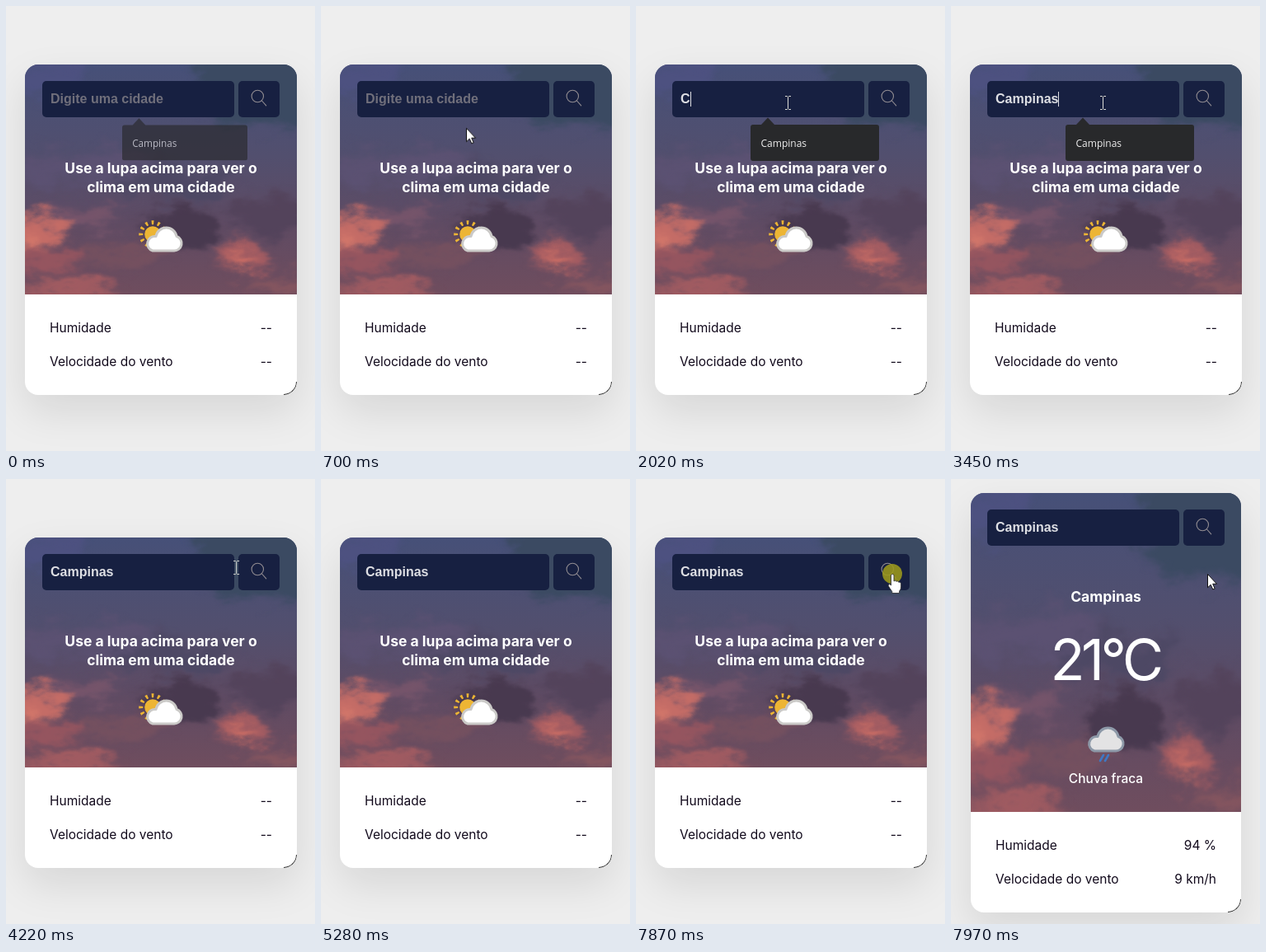
Write an HTML page that moves like this. It is 375x540 px and loops after 8 s.

```html
<!DOCTYPE html>
<html lang="pt-BR">
<head>
<meta charset="utf-8">
<title>Clima</title>
<style>
  html, body { margin: 0; width: 100%; height: 100%; overflow: hidden; background: #eee; }
  .stage { position: absolute; left: 0; top: 0; width: 375px; height: 540px; overflow: hidden; background: #eee; }
  .stage * { animation-duration: 8s; animation-iteration-count: infinite; animation-timing-function: step-end; }
  .ui { position: absolute; left: 0; top: 0; }

  .card {
    position: absolute; left: 23px; top: 71px; width: 330px; height: 401px;
    border-radius: 16px; overflow: hidden; background: #fff;
    box-shadow: 0 20px 50px rgba(0, 0, 0, .1);
    animation-name: grow;
  }
  .card::after {
    content: ""; position: absolute; right: 0; bottom: 0; width: 15px; height: 15px;
    border: solid #333; border-width: 0 1px 1px 0; border-bottom-right-radius: 16px;
  }
  .sky { display: block; width: 100%; height: calc(100% - 122px); }

  text { font-family: Inter, sans-serif; }
  .title { font-size: 17.5px; font-weight: 700; fill: #fff; text-anchor: middle; }
  .row { font-size: 15.5px; fill: #120a1c; }
  .end { text-anchor: end; }
  .temp { font-size: 69px; letter-spacing: -4.5px; fill: #fff; text-anchor: middle; }
  .note { font-size: 15.5px; font-weight: 500; fill: #fff; text-anchor: middle; }

  .before { animation-name: before; }
  .after { opacity: 0; animation-name: after; }
  .search { animation-name: lift; }
  .labels { animation-name: drop; }

  .field { font: bold 16px/18px "Liberation Sans", Arial, sans-serif; height: 18px; white-space: pre; color: #dedfe4; }
  .field span { display: inline-block; height: 18px; border-right: 1px solid transparent; animation-name: caret; }
  .field span::after { content: ""; animation: type 8s step-end infinite; }
  .hint { font: bold 16px "Liberation Sans", Arial, sans-serif; fill: #706f7b; animation-name: hint; }

  .tip { transform-origin: 217px 164px; animation-name: tip; animation-timing-function: linear; }
  .tip text { font: 12px "Open Sans", sans-serif; fill: #eee; }

  .pointer { animation-name: move; animation-timing-function: linear; }
  .arrow { animation-name: arrow; }
  .ibeam { animation-name: ibeam; }
  .hand { animation-name: hand; }
  .click { opacity: 0; animation-name: click; }

  @keyframes grow { 99.625% { left: 24px; top: 17px; width: 328px; height: 509px; } }
  @keyframes before { 99.625%, 100% { opacity: 0; } }
  @keyframes after { 99.625%, 100% { opacity: 1; } }
  @keyframes lift { 0% { transform: none; } 99.625%, 100% { transform: translate(0, -54px); } }
  @keyframes drop { 0% { transform: none; } 99.625%, 100% { transform: translate(1px, 54px); } }

  @keyframes hint { 0% { opacity: 1; } 25.25%, 100% { opacity: 0; } }
  @keyframes type {
    0% { content: ""; }
    25.25% { content: "C"; }
    32% { content: "Ca"; }
    33.5% { content: "Cam"; }
    36% { content: "Camp"; }
    38.5% { content: "Campi"; }
    39.75% { content: "Campin"; }
    41.625% { content: "Campina"; }
    42.75%, 100% { content: "Campinas"; }
  }
  @keyframes caret {
    0% { border-color: transparent; }
    13.75% { border-color: #dedfe4; }
    20.75% { border-color: transparent; }
    25.25% { border-color: #dedfe4; }
    50%, 100% { border-color: transparent; }
  }
  @keyframes tip {
    0% { opacity: .66; transform: scale(.975); }
    1.875%, 13.2% { opacity: 0; transform: scale(.95); }
    15.25%, 43.4% { opacity: 1; transform: none; }
    45%, 100% { opacity: 0; transform: scale(.95); }
  }

  @keyframes move {
    0%, .625% { transform: translate(311px, 498px); animation-timing-function: ease-in-out; }
    8.75% { transform: translate(176px, 148px); }
    10.625%, 50% { transform: translate(184px, 117px); }
    52.75% { transform: translate(279px, 107px); animation-timing-function: ease-out; }
    58.375%, 64.125% { transform: translate(303px, 119px); }
    66%, 89.49% { transform: translate(385px, 120px); }
    89.5% { transform: translate(368px, 148px); }
    91.375%, 93.25% { transform: translate(291px, 115px); }
    93.875%, 100% { transform: translate(311px, 115px); }
  }
  @keyframes arrow {
    0% { opacity: 0; } .625% { opacity: 1; } 9.5% { opacity: 0; }
    64.9% { opacity: 1; } 66% { opacity: 0; }
    89.5% { opacity: 1; } 90.5% { opacity: 0; }
    99.625%, 100% { opacity: 1; }
  }
  @keyframes ibeam { 0% { opacity: 0; } 9.5% { opacity: 1; } 53.2%, 100% { opacity: 0; } }
  @keyframes hand {
    0% { opacity: 0; } 53.2% { opacity: 1; } 64.9% { opacity: 0; }
    90.5% { opacity: 1; } 99.625%, 100% { opacity: 0; }
  }
  @keyframes click { 0% { opacity: 0; } 98.375% { opacity: .88; } 99.625%, 100% { opacity: 0; } }
</style>
</head>
<body>
<div class="stage">
  <div class="card">
    <svg class="sky" viewBox="0 0 330 279" preserveAspectRatio="none">
      <defs>
        <linearGradient id="dusk" x2="0" y2="1">
          <stop stop-color="#465078"/>
          <stop offset=".4" stop-color="#524f6e"/>
          <stop offset=".7" stop-color="#5f4b63"/>
          <stop offset="1" stop-color="#6f4d5e"/>
        </linearGradient>
        <filter id="cloudy" filterUnits="userSpaceOnUse" x="-40" y="-40" width="410" height="360" color-interpolation-filters="sRGB">
          <feGaussianBlur stdDeviation="6" result="soft"/>
          <feTurbulence type="fractalNoise" baseFrequency=".022 .04" numOctaves="4" seed="7"/>
          <feDisplacementMap in="soft" scale="50" xChannelSelector="R" yChannelSelector="G"/>
        </filter>
      </defs>
      <rect width="330" height="279" fill="url(#dusk)"/>
      <g filter="url(#cloudy)">
        <ellipse cx="300" cy="25" rx="100" ry="50" fill="#3b4a62"/>
        <ellipse cx="25" cy="15" rx="50" ry="20" fill="#4d5180"/>
        <ellipse cx="75" cy="125" rx="80" ry="22" fill="#5b5172"/>
        <ellipse cx="180" cy="145" rx="70" ry="20" fill="#4d4864"/>
        <ellipse cx="75" cy="185" rx="45" ry="14" fill="#75546a"/>
        <ellipse cx="190" cy="198" rx="50" ry="24" fill="#48394f"/>
        <ellipse cx="300" cy="180" rx="50" ry="22" fill="#53435b"/>
        <ellipse cx="120" cy="230" rx="60" ry="14" fill="#74505f"/>
        <ellipse cx="20" cy="240" rx="50" ry="15" fill="#95555f"/>
        <ellipse cx="20" cy="200" rx="34" ry="18" fill="#c46c66"/>
        <ellipse cx="8" cy="218" rx="16" ry="11" fill="#d2766a"/>
        <ellipse cx="55" cy="275" rx="65" ry="10" fill="#a45c61"/>
        <ellipse cx="265" cy="232" rx="32" ry="18" fill="#a15b61"/>
        <ellipse cx="262" cy="238" rx="14" ry="9" fill="#cb6d64"/>
        <ellipse cx="310" cy="268" rx="40" ry="12" fill="#84555f"/>
      </g>
    </svg>
  </div>

  <svg class="ui" width="375" height="540" viewBox="0 0 375 540">
    <defs>
      <path id="cloud" stroke-width="3" stroke-linejoin="round" d="M178 297H203.5A9 9 0 0 0 207 279.5A12.7 12.7 0 0 0 182 279.5A9 9 0 0 0 178 297Z"/>
    </defs>

    <g class="before">
      <text class="title" x="188" y="203">Use a lupa acima para ver o</text>
      <text class="title" x="188" y="226">clima em uma cidade</text>
      <circle cx="178" cy="277" r="9.8" fill="#edb534"/>
      <circle cx="178" cy="277" r="14.3" fill="none" stroke="#edb534" stroke-width="5" pathLength="12" stroke-dasharray=".36 .64" stroke-dashoffset=".18"/>
      <use href="#cloud" fill="#fff" stroke="#cbcac8"/>
      <text class="row end" x="323" y="396">--</text>
      <text class="row end" x="323" y="437">--</text>
    </g>

    <g class="after">
      <text class="title" x="188" y="149">Campinas</text>
      <text class="temp" x="187" y="244">21°C</text>
      <path d="M185 335l-4 7M191 335l-4 7" stroke="#3f78c4" stroke-width="2.6" stroke-linecap="round"/>
      <use href="#cloud" y="33" x="-4" fill="#e3e3e4" stroke="#8d99a8"/>
      <text class="note" x="188" y="369">Chuva fraca</text>
      <text class="row end" x="322" y="450">94 %</text>
      <text class="row end" x="322" y="491">9 km/h</text>
    </g>

    <g class="labels">
      <text class="row" x="53" y="396">Humidade</text>
      <text class="row" x="53" y="437">Velocidade do vento</text>
    </g>

    <g class="search">
      <rect x="44" y="91" width="233" height="44" rx="5" fill="#172041"/>
      <rect x="282" y="91" width="50" height="44" rx="5" fill="#172041"/>
      <g fill="none" stroke="#918c91" stroke-width="1.1" stroke-linecap="round">
        <circle cx="305.3" cy="109.5" r="7.2"/>
        <path d="M310.5 115L315.7 120.8"/>
      </g>
      <text class="hint" x="54" y="118">Digite uma cidade</text>
      <foreignObject x="54" y="104" width="215" height="20"><div class="field"><span></span></div></foreignObject>
    </g>

    <g class="tip">
      <path d="M152 144L160 135.5L168 144H292a3 3 0 0 1 3 3V185a3 3 0 0 1 -3 3H142a3 3 0 0 1 -3 -3V147a3 3 0 0 1 3 -3Z" fill="#28292b"/>
      <text x="151.5" y="171">Campinas</text>
    </g>

    <circle class="click" cx="311" cy="115" r="12" fill="#9d991c"/>
    <g class="pointer">
      <path class="arrow" d="M.5 .5V16.8L4.2 13.3L6.8 19L9.2 18L6.7 12.3H11.5Z" fill="#fff" stroke="#111"/>
      <path class="ibeam" d="M-3 -7.5H-.5L.5 -6.5L1.5 -7.5H4M.5 -6.5V7.5M-3 8.5H-.5L.5 7.5L1.5 8.5H4" fill="none" stroke="#dcdcd6"/>
      <path class="hand" d="M-1.5 1.4Q.2 -.6 2 1.4V9Q3.7 7.6 4.9 9.2Q6.8 8.4 7.8 10.2Q9.8 9.6 10.6 11.8V16Q10.6 19 8.6 21V23.5H-.2V21.5Q-3 18 -4.8 14.6Q-5 12.4 -3 12.6L-1.5 14Z" fill="#fff" stroke="#2a2a2a" stroke-width=".8"/>
    </g>
  </svg>
</div>
</body>
</html>
```
